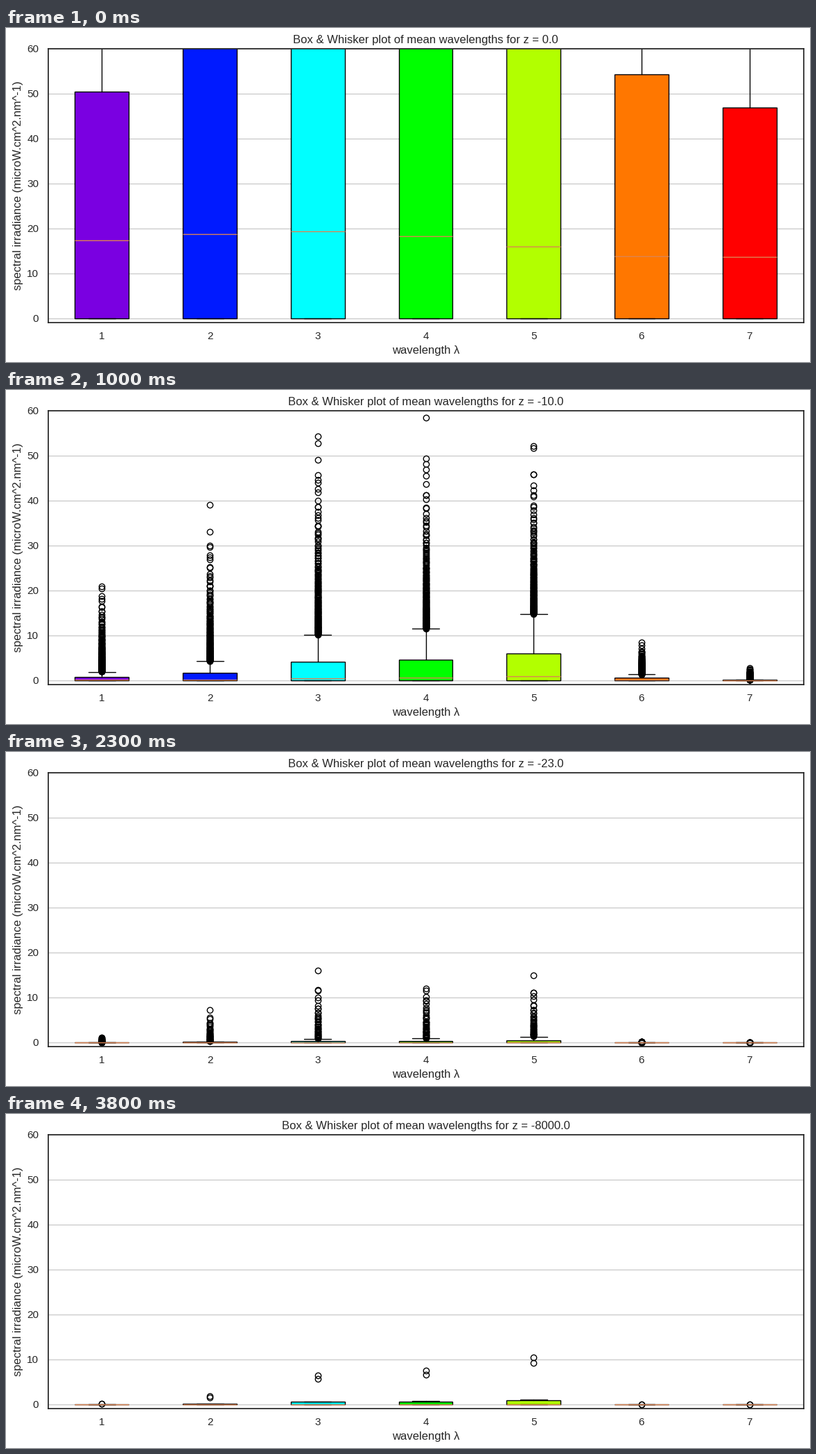
A matplotlib script that plays this animation: 1160 px wide and 483 px high, repeating every 3.9 s.

```python
import numpy as np
import matplotlib.pyplot as plt
from matplotlib.animation import FuncAnimation

W, H, DPI = 1160, 483, 100
FRAMES, INTERVAL = 39, 100
LAST = FRAMES - 1
SPARSE = 29   # from here on each depth holds a single record

plt.rcParams.update({
    "font.family": "Liberation Sans",
    "font.size": 12, "axes.titlesize": 12, "axes.labelsize": 12,
    "xtick.labelsize": 11, "ytick.labelsize": 11,
    "text.color": "0.15", "axes.labelcolor": "0.15",
    "xtick.color": "0.15", "ytick.color": "0.15",
    "axes.edgecolor": "0.15", "axes.linewidth": 1.25, "axes.axisbelow": True,
    "grid.color": "0.8", "grid.linewidth": 1,
    "xtick.major.size": 6, "ytick.major.size": 6,
    "xtick.bottom": False, "ytick.left": False,
    "lines.solid_capstyle": "round",
})

COLORS = ["#7a00e1", "#001aff", "#00ffff", "#00ff00", "#b2ff00", "#ff7700", "#ff0000"]
BANDS = np.arange(1, len(COLORS) + 1)

# Light decays with depth as surface * exp(-rate * depth ** bend), per band
Q3_SURFACE = np.array([50.4, 91, 83.4, 90.6, 94.4, 54.3, 46.9])
Q3_RATE = np.array([0.42, 0.795, 0.537, 0.531, 0.471, 0.31, 0.52])
Q3_BEND = np.array([1, 0.7, 0.75, 0.75, 0.77, 1.17, 1.11])
MED_SURFACE = np.array([17.3, 18.7, 19.4, 18.3, 15.9, 13.8, 13.6])
MED_RATE = np.array([0.64, 0.574, 0.44, 0.4, 0.33, 0.53, 0.77])
TAIL = np.array([26, 27, 27, 24, 20, 11, 13])


def upper_quartile(depth):
    return Q3_SURFACE * np.exp(-Q3_RATE * depth ** Q3_BEND)


def median(depth):
    return MED_SURFACE * np.exp(-MED_RATE * depth ** 0.93)


def outliers(rng, low, top, n):
    """Exponential tail that starts at low and thins out towards top."""
    rank = np.arange(n) + 2 + rng.uniform(-0.8, 0.8, n)
    reach = np.log((n + 2) / rank) / np.log((n + 2) / 2)
    return low + max(top - low, 0) * np.maximum(reach, 0)


def box(q1, med, q3, lo, hi, fliers=()):
    return dict(q1=q1, med=med, q3=q3, whislo=lo, whishi=hi, fliers=fliers)


def depth_at(i):
    return 8000.0 if i == LAST else float(i + np.clip(i - 25, 0, 4))


def stats_at(i):
    rng = np.random.default_rng(100 + i)
    if i == LAST:
        return [box(0, 0.03 * q, q, 0, 1.2 * q, [11 * q, 12.5 * q])
                for q in upper_quartile(20.0)]
    depth = depth_at(i)
    q3 = upper_quartile(depth)
    if i >= SPARSE:
        return [box(v, v, v, v, v) for v in q3 * rng.uniform(0.5, 1.5, len(q3))]
    med = np.minimum(median(depth), q3)
    top = TAIL * q3 ** 0.55
    n = int(180 * np.exp(-0.3 * max(i - 18, 0)))
    return [box(0, m, q, 0, 2.5 * q, outliers(rng, 2.5 * q, t, n))
            for m, q, t in zip(med, q3, top)]


fig = plt.figure(figsize=(W / DPI, H / DPI), dpi=DPI, facecolor="white")
ax = fig.add_axes([60.54 / W, 56.7 / H, 1090 / W, 396.4 / H])
ax.set_xlim(0.5, 7.5)
ax.set_ylim(-1, 60)
ax.set_xticks(BANDS)
ax.set_yticks(range(0, 61, 10))
ax.grid(axis="y")
ax.set_xlabel("wavelength λ")
ax.set_ylabel("spectral irradiance (microW.cm^2.nm^-1)")
title = ax.set_title("")
drawn = []


def update(i):
    while drawn:
        drawn.pop().remove()
    parts = ax.bxp(stats_at(i), positions=BANDS, widths=0.5,
                   patch_artist=True, manage_ticks=False,
                   medianprops=dict(color="#dd8452"))
    for patch, color in zip(parts["boxes"], COLORS):
        patch.set_facecolor(color)
    for group in parts.values():
        drawn.extend(group)
    ax.set_xlim(0.5, 7.5)
    ax.set_ylim(-1, 60)
    z = 0.0 - depth_at(i)
    title.set_text(f"Box & Whisker plot of mean wavelengths for z = {z}")
    return drawn


anim = FuncAnimation(fig, update, frames=FRAMES, interval=INTERVAL,
                     init_func=lambda: update(0), repeat=True, repeat_delay=0)
plt.show()
```
